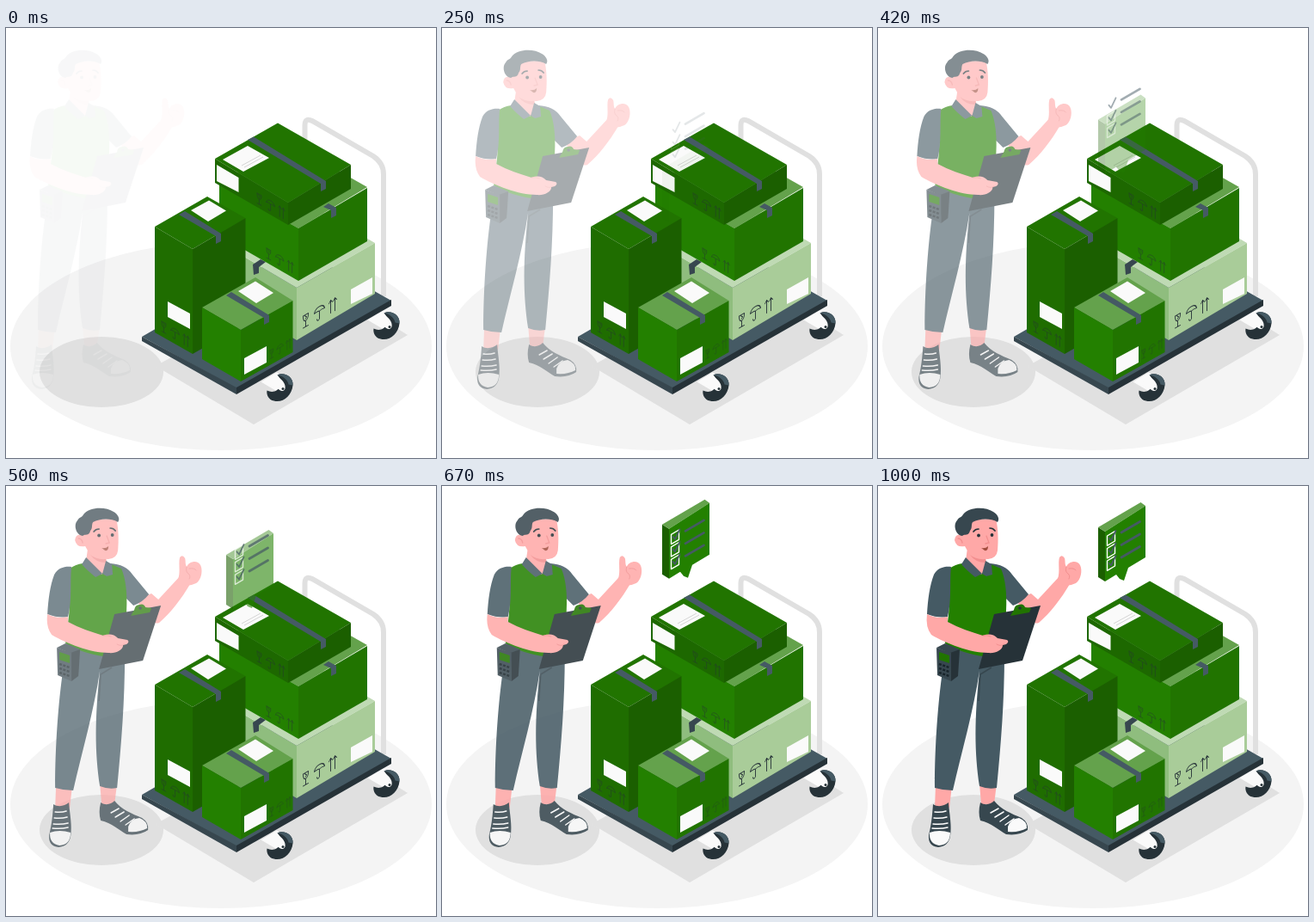
These frames come from a looping animation (500x500 px, 1.04 s). An HTML page:

```html
<!DOCTYPE html>
<html lang="en">
<head>
<meta charset="utf-8">
<title>Delivery trolley</title>
<style>
html, body { margin: 0; width: 100%; height: 100%; overflow: hidden; background: #fff; }
svg { display: block; width: 100%; height: 100%; }
.ground { fill: #f4f4f4; } .shade { fill: #e0e0e0; }
.lit { fill: #64a24c; } .top { fill: #217400; } .mid { fill: #238000; } .deep { fill: #1b5f00; }
.pale { fill: #a9cc99; }
.slate { fill: #455a64; } .dark { fill: #37474f; } .ink { fill: #263238; }
.white { fill: #fafafa; } .skin { fill: #ffa8a7; }
.line { fill: none; stroke: #263238; stroke-linecap: round; stroke-linejoin: round; }
.wline { fill: none; stroke: #fff; stroke-linecap: round; stroke-linejoin: round; }
.blush { fill: none; stroke: #f28f8f; stroke-linecap: round; }
</style>
</head>
<body>
<svg viewBox="0 0 500 500">
  <defs>
    <g id="marks" class="line" stroke-width=".9">
      <path d="M0 0H6C6 5 5 7 3 7S0 5 0 0M3 7V14M0 14H6M2 1L4 3L3 5"/>
      <path d="M13 5C14-2 24-2 25 5C22 4 21 4 19 5C17 4 16 4 13 5M19 5V14Q17 17 16 13"/>
      <path d="M32 15V0M30 3L32 0L34 3M37 15V0M35 3L37 0L39 3"/>
    </g>
    <g id="wheel">
      <path class="white" d="M-22-7L-4-18L9-10L5 1L-5 3Z"/>
      <path class="ink" d="M-3-15C4-19 16-14 15-3C14 9 3 18-7 15C-13 14-16 8-15 3C-9 6-2 4 0-2C2-8 0-12-3-15Z"/>
      <path class="slate" d="M-3-15C4-19 16-14 15-3L10-4C9-10 3-14-3-15Z"/>
      <path class="white" d="M-15-4L-1-12C4-8 7-4 6 1C4 5 0 4-3 0Z"/>
      <circle class="ink" cx="3.500" cy="1" r="1.500"/>
    </g>
    <g id="item">
      <path class="wline" stroke-width="1.400" d="M266.500 58L275.500 52.700V64L266.500 69.300Z"/>
      <path class="line" style="stroke:#455a64" stroke-width="1.800" d="M268.500 60.500L271 63.500L276.500 52"/>
      <path class="line" style="stroke:#455a64" stroke-width="2.700" d="M283 54L304.500 41.500"/>
    </g>
  </defs>

  <ellipse class="ground" cx="250" cy="370" rx="245" ry="121"/>
  <ellipse class="shade" cx="111" cy="400" rx="72" ry="41"/>
  <path class="shade" d="M174 393L360 290L467 357L288 461Z"/>
  <path d="M347.500 150V113Q347.500 104 356 108L427 149Q439 157 439 170V312" fill="none" stroke="#e0e0e0" stroke-width="6"/>

  <use href="#wheel" x="442.500" y="346.500"/>
  <use href="#wheel" x="318.500" y="418.500"/>
  <path class="slate" d="M158 359L338 255L448 317L268 419Z"/>
  <path class="dark" d="M158 359L268 418V426L158 364Z"/>
  <path class="ink" d="M268 418L448 316V323L268 426Z"/>

  <!-- pale box -->
  <path fill="#8fbd7e" d="M248 249L338 302V363L248 311Z"/>
  <path fill="#bfdab4" d="M248 249L340 198L429 250L338 302Z"/>
  <path class="pale" d="M338 302L429 250V309L338 363Z"/>
  <path class="dark" d="M287 275L296 269L302 272L294 278V285L288 287Z"/>
  <path class="white" d="M401 304L426 290V309L401 321Z"/>
  <use href="#marks" transform="matrix(1 -.577 0 1 345.500 335)"/>

  <!-- middle box -->
  <path class="lit" d="M248 181L330 134L420 185L340 233Z"/>
  <path class="mid" d="M248 181L340 233V294L248 241Z"/>
  <path class="top" d="M340 233L420 186V248L340 294Z"/>
  <path class="slate" d="M369 208L375 204L384 209V218L378 221V212Z"/>
  <use href="#marks" transform="matrix(.800 .450 0 .800 303 256)" opacity=".55"/>

  <!-- upper box -->
  <path class="top" d="M243 152L316 110.500L401 159L328 203Z"/>
  <path fill="#1d6800" d="M243 152L328 203V229L243 180Z"/>
  <path class="deep" d="M328 203L401 159V187L328 229Z"/>
  <path class="slate" d="M281 130L288 126.500L372 178V187L366 190V181Z"/>
  <path class="white" d="M252 153L281 137L306 151L276 167ZM245 159L270.500 174V191L245 178Z"/>
  <path fill="none" stroke="#d5d5d5" d="M274 160L296 148M277 162L299 150"/>
  <use href="#marks" transform="matrix(.820 .470 0 .820 292 192)" opacity=".55"/>

  <!-- tall box -->
  <path class="top" d="M173 231L234 196L278.500 221L217 257Z"/>
  <path fill="#1f6d00" d="M173 231L217 257V379L173 354Z"/>
  <path class="deep" d="M217 257L278.500 221V344L217 379Z"/>
  <path class="slate" d="M201 217L208 213L250 239V248L244 251V242Z"/>
  <path class="white" d="M215 212L236 200.500L256 212.500L235 225ZM188 318L214 332V350L188 336Z"/>
  <use href="#marks" transform="matrix(.820 .470 0 .820 181 341)" opacity=".55"/>

  <!-- front box -->
  <path class="lit" d="M228 325L290 290L333.500 317L273 351Z"/>
  <path class="mid" d="M228 325L273 351V411L228 385Z"/>
  <path class="top" d="M273 351L333.500 317V377L273 411Z"/>
  <path class="slate" d="M256 311L262 307L306 334V342L300 345V337Z"/>
  <path class="white" d="M270 306L290 294.500L311 308L291 320ZM277 384L303 370V389L277 403Z"/>
  <use href="#marks" transform="matrix(.620 -.360 0 .700 307 375)" opacity=".4"/>

  <g id="bubble">
    <path class="deep" d="M256 48L264 53V111L256 106Z"/>
    <path class="lit" d="M256 48L305.500 19L311 23L264 53Z"/>
    <path class="mid" d="M264 53L311 23V83L291 95L286 110L281 108L277 103L264 111Z"/>
  </g>
  <g id="list">
    <use href="#item"/><use href="#item" y="14.500"/><use href="#item" y="29"/>
  </g>

  <g id="man">
    <!-- legs and shoes -->
    <path class="skin" d="M67 348H86L83 374H66ZM118 346H138L135 370H120Z"/>
    <path class="slate" d="M80 180L147 196C147 250 143 300 138 351Q128 353 118 349C112 310 112 270 118 215C111 262 97 310 87 354Q76 354 66 351C66 300 70 250 75 215Z"/>
    <path fill="none" stroke="#37474f" stroke-width="1.500" d="M117 250L119 219L132 211"/>
    <path class="dark" d="M64 370C70 374 77 372 82 368C83 382 86 394 84 407Q82 419 70 420Q58 419 59 406C62 394 63 384 64 370ZM119 368C125 372 131 370 135 366C143 376 155 381 167 386Q175 391 174 400Q164 407 149 405C140 400 132 392 119 389Q116 380 119 368Z"/>
    <path class="white" d="M60 403Q71 399 84 403Q84 417 71 418Q59 416 60 403ZM151 396Q154 387 164 386Q174 390 173 398Q164 403 151 402Z"/>
    <path class="wline" stroke-width="1.500" d="M66 379Q73 380 79 378M65 386Q73 387 80 385M64 393Q73 394 81 392M63 398Q73 399 81 397M131 380L140 375M136 385L146 379M142 390L152 383M148 394L158 387"/>

    <!-- raised arm -->
    <path class="skin" d="M160 132L178 125L186 132L211 105L223 114C213 131 200 148 187 159Q181 161 175 155Z"/>
    <path class="skin" d="M209 108C212 99 209 90 211 83Q214 79 217 84C218 88 217 91 219 94C222 87 232 86 235 92C238 98 236 109 230 113Q220 118 211 114Z"/>
    <path class="blush" d="M219 94Q217 100 221 102M222 96Q228 95 230 98M221 102Q224 104 222 108"/>
    <path class="slate" d="M130 90Q148 91 156 103L175 126Q168 135 157 139L146 128Z"/>

    <!-- torso -->
    <path class="mid" d="M98 90Q112 98 131 91L143 96C148 108 150 124 149 145L146 200Q104 199 78 183L82 150C84 130 82 110 83 96Q90 91 98 90Z"/>
    <path class="slate" d="M85 94C78 93 69 95 65 103C60 116 58 132 57 149Q70 154 81 152C86 132 83 112 85 94Z"/>
    <path class="skin" d="M104 72L125 82L127 94L120 103L102 87Z"/>
    <path d="M107 80Q114 86 125 85L125 89Q113 89 107 80Z" fill="#f28f8f"/>
    <path class="slate" d="M102 83L121 102L113 106Q103 98 97 91ZM125 87L132 91L133 103L126 105L121 102Z"/>

    <!-- head -->
    <path class="skin" d="M104 48L110 39L137 38C140 50 140 64 139 75Q138 84 128 85Q108 85 101 70Q91 72 89 63Q90 55 98 57Z"/>
    <path class="dark" d="M98 58C90 57 87 45 92 40C94 36 97 37 99 33C106 24 125 24 134 30C139 33 142 38 139 42C130 37 118 38 110 42C108 45 110 49 107 52C105 59 101 55 98 58Z"/>
    <path class="line" stroke-width="1.700" d="M111 53Q113 50 117 50M130 49Q134 49 136 52"/>
    <circle class="ink" cx="117" cy="57.500" r="1.900"/><circle class="ink" cx="132.500" cy="57" r="1.900"/>
    <path class="blush" stroke-width="1.300" d="M126 58L129 66L125 67M93 61Q97 61 98 66"/>
    <path d="M120 72Q125 73 128 70Q128 76 124 75Z" fill="#a24e3f"/>

    <!-- scanner -->
    <path class="dark" d="M68 188L78 183L95 190L85 195Z"/>
    <path class="ink" d="M84 194L95 190L93 221L85 227Z"/>
    <path class="dark" d="M68 188L85 194V227L69 220Z"/>
    <path class="top" d="M71 193L83 197V206L71 202Z"/>
    <path fill="none" stroke="#18242a" stroke-width="2.400" stroke-dasharray="3 1.500" d="M71 207L83 211M71 212L83 216M71 217L83 221"/>

    <!-- clipboard -->
    <path class="ink" d="M135 149L189 139L168 203L117 213Z"/>
    <path class="top" d="M154 151L158 144Q159 138 164 138Q169 136 171 141L178 142L176 147Z"/>
    <circle class="ink" cx="165" cy="142" r="1.800"/>
    <path class="skin" d="M57 149Q69 155 81 152L81 158C94 165 109 170 122 174Q132 170 139 177L150 179Q153 181 149 184L145 185C145 191 136 195 128 194C107 194 79 183 62 173Q55 164 57 149Z"/>
    <path class="blush" d="M138 184Q143 187 146 184M122 174Q127 173 131 175"/>
  </g>
</svg>
<script>
const LOOP = 1040, STEP = LOOP / 25;
const [man, bubble, list] = ["man", "bubble", "list"].map(id => document.getElementById(id));

// CSS-style cubic-bezier easing, solved by bisection
function bezier(x1, y1, x2, y2) {
  const at = (a, b, s) => 3 * (1 - s) * s * ((1 - s) * a + s * b) + s ** 3;
  return x => {
    if (x >= 1) return 1;
    let lo = 0, hi = 1;
    for (let i = 0; i < 24; i++) {
      const s = (lo + hi) / 2;
      if (at(x1, x2, s) < x) lo = s; else hi = s;
    }
    return at(y1, y2, lo);
  };
}
const easeOut = bezier(0, 0, .58, 1);
const overshoot = bezier(.36, -.01, .5, 1.42);

function place(el, x, y, alpha) {
  el.setAttribute("transform", `translate(${x} ${y})`);
  el.setAttribute("opacity", Math.max(0, Math.min(1, alpha)));
}

function draw() {
  const tick = Math.floor((performance.now() % LOOP + 3) / STEP) % 25;
  const t = (tick * STEP + 20) / 1000;
  const slide = easeOut(t), rise = overshoot(t), shown = Math.max(0, rise);
  place(man, -30 * (1 - slide), 0, slide);
  place(bubble, 0, 158 * (1 - rise), shown ** 2.4);
  place(list, 0, 79 * (1 - rise), shown ** 1.5);
  requestAnimationFrame(draw);
}
draw();
</script>
</body>
</html>
```
